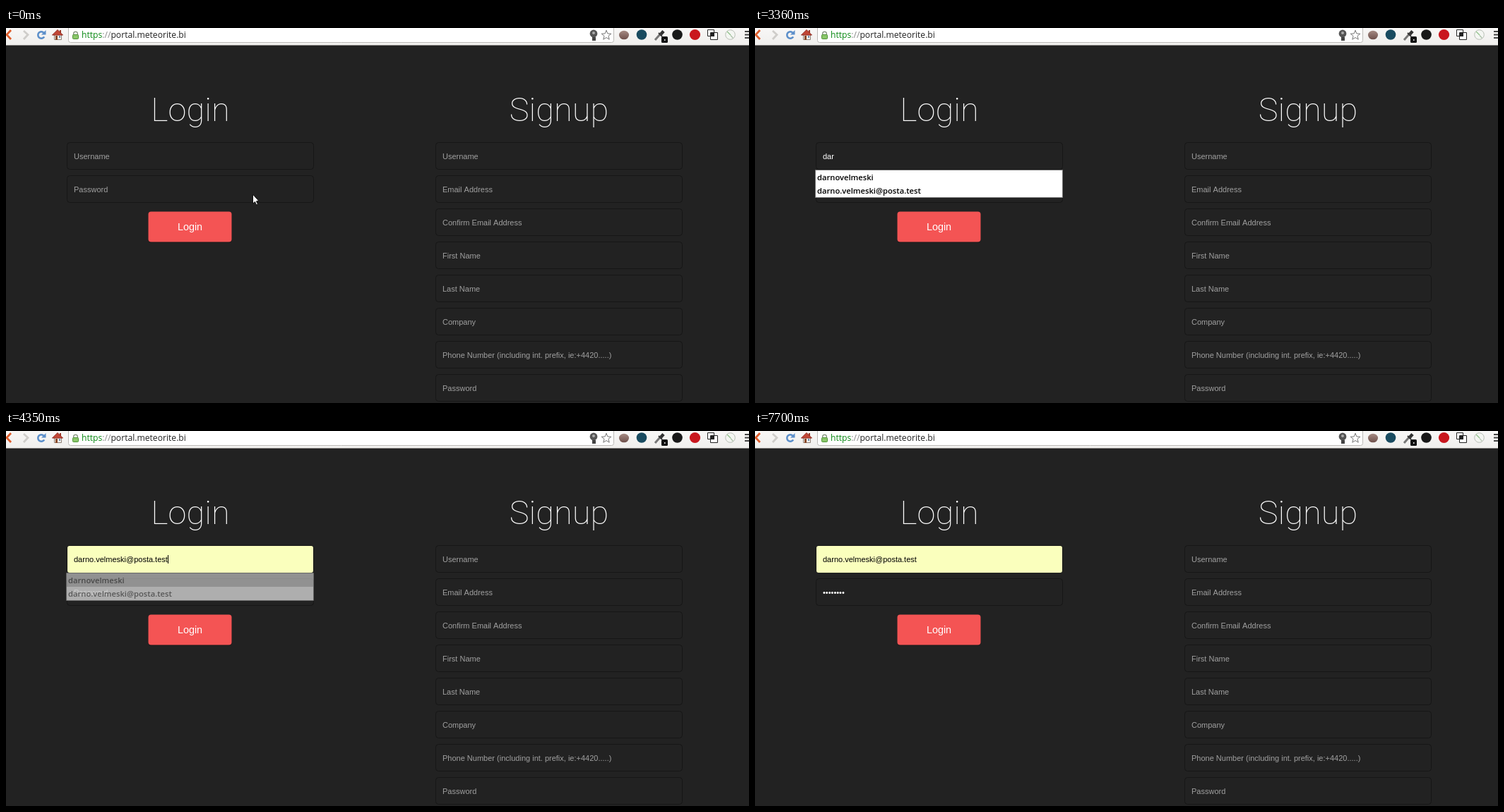
These frames come from a looping animation (1052x532 px, 8000 ms). An HTML page with a canvas:

```html
<!DOCTYPE html>
<html lang="en">
<head>
<meta charset="utf-8">
<title>Login</title>
<style>
html, body { margin: 0; width: 100%; height: 100%; overflow: hidden; background: #222; }
canvas { display: block; width: 1052px; height: 532px; }
</style>
</head>
<body>
<canvas id="stage" width="1052" height="532"></canvas>
<script>
const LOOP = 8000;
const USER = 'darnovelmeski';
const MAIL = 'darno.velmeski@posta.test';
const SANS = '11px "Liberation Sans", Arial, sans-serif';
const MENU = '600 11.2px "Open Sans", "Noto Sans", sans-serif';
const SIGNUP = ['Username', 'Email Address', 'Confirm Email Address', 'First Name', 'Last Name',
  'Company', 'Phone Number (including int. prefix, ie:+4420.....)', 'Password'];
const KEY_TIMES = [5270, 5690, 6080, 6410, 6530, 6770, 6980, 7100];

const ctx = document.getElementById('stage').getContext('2d');

function rect(x, y, w, h, color) {
  ctx.fillStyle = color;
  ctx.fillRect(x, y, w, h);
}

function box(x, y, w, h, r, fill, stroke) {
  ctx.beginPath();
  ctx.roundRect(x, y, w, h, r);
  if (fill) { ctx.fillStyle = fill; ctx.fill(); }
  if (stroke) { ctx.strokeStyle = stroke; ctx.lineWidth = 1; ctx.stroke(); }
}

function disc(x, y, r, fill, stroke) {
  ctx.beginPath();
  ctx.arc(x, y, r, 0, Math.PI * 2);
  if (fill) { ctx.fillStyle = fill; ctx.fill(); }
  if (stroke) { ctx.strokeStyle = stroke; ctx.lineWidth = 1; ctx.stroke(); }
}

function line(points, color, width) {
  ctx.beginPath();
  points.forEach(p => ctx.lineTo(p[0], p[1]));
  ctx.strokeStyle = color;
  ctx.lineWidth = width;
  ctx.stroke();
}

function poly(points, fill, stroke) {
  ctx.beginPath();
  points.forEach(p => ctx.lineTo(p[0], p[1]));
  ctx.closePath();
  if (fill) { ctx.fillStyle = fill; ctx.fill(); }
  if (stroke) { ctx.strokeStyle = stroke; ctx.lineWidth = 1; ctx.stroke(); }
}

// Returns the x where the text ends.
function text(s, x, y, font, color, align = 'left') {
  ctx.font = font;
  ctx.textAlign = align;
  ctx.fillStyle = color;
  ctx.fillText(s, x, y);
  return x + ctx.measureText(s).width;
}

function field(x, y, label) {
  box(x + 0.5, y + 0.5, 349, 38, 4, '#222', '#161616');
  if (label) text(label, x + 10, y + 24, SANS, '#a0a0a0');
}

function caret(x, y, color = '#fff') {
  rect(Math.round(x), y, 1, 12, color);
}

function navIcons() {
  line([[7, 3], [1, 9.5], [7, 16]], '#de5c2a', 2.8);
  line([[25, 4], [31, 9.5], [25, 16]], '#cfcdca', 2.8);

  ctx.beginPath();
  ctx.arc(50, 10, 4.7, 0.5, Math.PI * 1.75);
  ctx.strokeStyle = '#5c8fca';
  ctx.lineWidth = 2.6;
  ctx.stroke();
  poly([[56.5, 3], [56.5, 9.5], [50, 9.5]], '#5c8fca');

  box(68.5, 8.5, 10, 8, 0, '#f3efe9', '#8d8078');
  rect(70, 11, 3, 6, '#8a4b2c');
  rect(75, 11, 2, 3, '#6f93b8');
  rect(76, 3, 2, 4, '#9b3b2a');
  poly([[65.5, 10], [73, 2.5], [80.5, 10]], '#c24636', '#8f2a20');
}

function lockIcon() {
  ctx.beginPath();
  ctx.arc(98.5, 8, 2.8, Math.PI, 0);
  ctx.lineTo(101.3, 10);
  ctx.moveTo(95.7, 8);
  ctx.lineTo(95.7, 10);
  ctx.strokeStyle = '#8c9a86';
  ctx.lineWidth = 1.5;
  ctx.stroke();
  box(94.5, 9.5, 8, 6, 1, '#8ac66a', '#4f9437');
}

function starIcon() {
  const pts = [];
  for (let i = 0; i < 10; i++) {
    const a = -Math.PI / 2 + i * Math.PI / 5, r = i % 2 ? 3.1 : 7.2;
    pts.push([850 + r * Math.cos(a), 10.4 + r * Math.sin(a)]);
  }
  poly(pts, '#fff', '#777');
}

function extensionIcons(t) {
  disc(832, 8, 5.4, '#555');
  disc(832, 7, 2, '#aaa');
  rect(830, 13, 5, 5, '#444');
  starIcon();

  ctx.beginPath();
  ctx.ellipse(875, 10, 7, 6.3, 0, 0, Math.PI * 2);
  const g = ctx.createLinearGradient(0, 4, 0, 17);
  g.addColorStop(0, '#a58a83');
  g.addColorStop(1, '#6b4d48');
  ctx.fillStyle = g;
  ctx.fill();

  disc(900, 9.5, 7.3, '#194b60');

  line([[919, 17], [926, 9]], '#777', 3);
  line([[924, 7], [929, 12]], '#333', 2);
  line([[927, 9], [931, 4.5]], '#333', 4.5);
  box(928, 12, 9, 9, 1.5, '#111');
  rect(932, 16, 1.5, 2, '#ddd');

  disc(950.5, 9.5, 7.3, '#181818');
  disc(975.5, 9.5, 7.6, '#c9171e');

  box(993.5, 2.5, 9, 9, 0, '#fff', '#222');
  box(997.5, 6.5, 10, 10, 0, '#fff', '#222');
  rect(998, 7, 5, 5, '#222');

  disc(1025.5, 9.5, 6.8, '#f4f6f2', '#b9bfb6');
  line([[1021, 5], [1026, 10]], '#8fc08a', 1.2);
  line([[1026, 10.5], [1029.5, 14.5]], t < 5010 ? '#a9bfa6' : '#b8c6b5', 1.2);

  for (const y of [4, 8.5, 13]) rect(1046, y, 6, 2, '#444');
}

function toolbar(t) {
  const g = ctx.createLinearGradient(0, 0, 0, 24);
  g.addColorStop(0, '#f8f7f6');
  g.addColorStop(1, '#f0efed');
  rect(0, 0, 1052, 24, g);
  rect(0, 24, 1052, 1, '#888684');
  box(88.5, -5.5, 772, 26, 3, '#fff', '#bcbab7');
  navIcons();
  lockIcon();
  const font = '12.15px "Open Sans", "Noto Sans", sans-serif';
  let x = text('https', 107, 14, font, '#0d8a16');
  x = text('://', x, 14, font, '#888');
  text('portal.meteorite.bi', x, 14, font, '#222');
  extensionIcons(t);
}

function page() {
  const title = '100 47px Roboto, Lato, sans-serif';
  text('Login', 261, 132, title, '#fff', 'center');
  text('Signup', 783, 132, title, '#fff', 'center');
  SIGNUP.forEach((label, i) => field(608, 162 + 47 * i, label));
  box(201.5, 261.5, 118, 43, 4, '#181818');
  box(201.5, 260.5, 118, 43, 4, '#f45454');
  text('Login', 260.5, 286.5, '14.4px "Liberation Sans", Arial, sans-serif', '#fff', 'center');
}

function userField(t) {
  field(86, 162, t < 2700 ? 'Username' : '');
  if (t < 2700) {
    if (t >= 840 && (t < 1480 || t >= 2080)) caret(96, 176);
    return;
  }
  if (t < 3870) {
    const end = text(USER.slice(0, t < 2820 ? 2 : 3), 96, 186, SANS, '#fff');
    if (t < 3360) caret(end, 176);
    return;
  }
  box(87, 163, 348, 38, 3, '#faffbd');
  const value = t < 4020 ? USER : MAIL;
  const end = text(value, 96, 186, SANS, '#000');
  if (t < 4290) {
    const from = 96 + ctx.measureText(value.slice(0, 3)).width;
    rect(Math.round(from), 176, Math.round(end) - Math.round(from), 12, '#f07746');
    text(value.slice(3), from, 186, SANS, '#fff');
  } else if (t < 4590) {
    caret(end + 0.5, 176, '#000');
  }
}

function passField(t) {
  const n = KEY_TIMES.filter(k => t >= k).length;
  field(86, 209, n ? '' : 'Password');
  const end = text('•'.repeat(n), 96, 233, SANS, '#fff');
  if (t >= 4590 && t < 7700) caret(end, 223);
}

function suggestions(t) {
  if (t < 2700 || t >= 4470) return;
  // The list fades away in three short steps.
  ctx.globalAlpha = t < 4290 ? 1 : 1 - (Math.floor((t - 4290) / 60) + 1) / 4;
  box(85.5, 201.5, 350, 39, 0, '#fff', '#777');
  if (t >= 3870) rect(86, t < 4020 ? 202 : 221, 349, 19, '#cbcbcb');
  text(USER, 88, 216, MENU, '#000');
  text(MAIL, 88, 235, MENU, '#000');
  ctx.globalAlpha = 1;
}

function pointer(t) {
  if (t >= 880) return;
  const step = t < 30 ? 0 : Math.min(14, Math.floor((t - 30) / 59.2) + 1);
  const p = step / 14, q = 1 - p;
  // Sweeps left, then up to the right.
  const curve = (a, b, c, d) => a * q ** 3 + 3 * b * q * q * p + 3 * c * q * p * p + d * p ** 3;
  const x = curve(349, 265, 238, 389);
  const y = curve(235.5, 232, 194, 189);
  const shape = [[0, 0], [0, 13], [3, 10.5], [5, 15], [7, 14], [5, 9.8], [8.5, 9.5]];
  poly(shape.map(s => [x + s[0] + 0.5, y + s[1] + 0.5]), '#fff', '#111');
}

function frame(now) {
  const t = now % LOOP;
  rect(0, 0, 1052, 532, '#222');
  toolbar(t);
  page();
  userField(t);
  passField(t);
  suggestions(t);
  pointer(t);
}

const start = performance.now();
function tick() {
  frame(performance.now() - start);
  requestAnimationFrame(tick);
}
tick();
</script>
</body>
</html>
```
